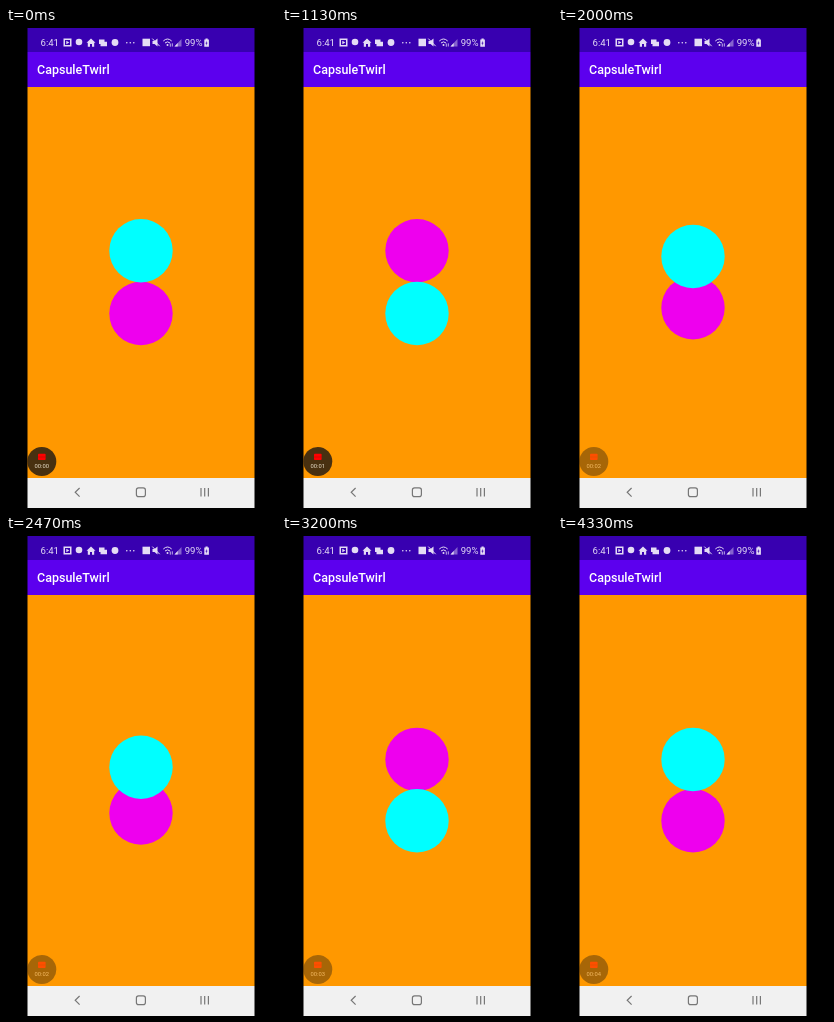
Animation, 270 px wide and 480 px high, one loop 4390 ms. Source, as an HTML page:

```html
<!DOCTYPE html>
<html lang="en">
<head>
<meta charset="utf-8">
<title>CapsuleTwirl</title>
<style>
  html, body { margin: 0; width: 100%; height: 100%; overflow: hidden; background: #000; }
  svg { display: block; width: 100%; height: 100%; }
  text { font-family: Roboto, "Open Sans", sans-serif; }
</style>
</head>
<body>
<svg viewBox="0 0 270 480" xmlns="http://www.w3.org/2000/svg">
  <rect width="270" height="480" fill="#000"/>
  <rect x="21.5" width="227" height="24" fill="#3800b0"/>
  <rect x="21.5" y="24" width="227" height="35" fill="#5c00ee"/>
  <rect x="21.5" y="59" width="227" height="391" fill="#ff9800"/>
  <rect x="21.5" y="450" width="227" height="30" fill="#f1f1f1"/>

  <!-- status bar -->
  <g fill="#e4dcf5">
    <text x="34.5" y="18" font-size="9.6">6:41</text>
    <path d="M57.5 10.5h8v8h-8z M59 12v5h5v-5z" fill-rule="evenodd"/>
    <path d="M60.3 12.8l3 1.7-3 1.7z"/>
    <circle cx="73" cy="14" r="3.3"/>
    <path d="M80.5 14.8L85 10.5l4.5 4.3h-1.3v3.9h-2.2v-2.6h-2v2.6h-2.2v-3.9z"/>
    <path d="M93 11.5h5.5v2.2H101v4.6h-6.5v-2.3H93z"/>
    <circle cx="109" cy="14.5" r="3.4"/>
    <circle cx="120.8" cy="14.7" r=".8"/>
    <circle cx="124.3" cy="14.7" r=".8"/>
    <circle cx="127.8" cy="14.7" r=".8"/>
    <rect x="136.5" y="10.7" width="7.5" height="7.5"/>
    <path d="M146.5 13h2l3-2.5v8l-3-2.5h-2z"/>
    <path d="M146.3 10.6l7.4 7.6" stroke="#e4dcf5" stroke-width="1"/>
    <g fill="none" stroke="#e4dcf5" stroke-width="1">
      <path d="M157.3 13q4.2-4 8.4 0M159 15q2.5-2.3 5 0"/>
      <path d="M164.3 15.5v3.2M166.3 15.3v3.2" stroke-width=".8"/>
    </g>
    <circle cx="161.5" cy="17" r="1"/>
    <path d="M168.5 18.5l7-7.5v7.5z" opacity=".45"/>
    <path d="M168.5 18.5l3.2-3.4v3.4z"/>
    <text x="178.7" y="18" font-size="9.6">99%</text>
    <path d="M198.3 11.4h1.2v-1h2.2v1h1.2v7.4h-4.6z"/>
    <path d="M200.9 12.7l-1.5 2.8h1l-.4 2.2 1.6-2.9h-1z" fill="#3800b0"/>
  </g>

  <text x="31" y="46" font-size="12.5" font-weight="500" fill="#fff">CapsuleTwirl</text>

  <circle id="rear" cx="135" r="31.7" fill="#ee00ee"/>
  <circle id="front" cx="135" r="31.7" fill="#0ff"/>

  <g id="badge">
    <circle cx="35.8" cy="433.5" r="14.5" fill="#483010"/>
    <rect x="32" y="425.8" width="7.6" height="6.2" rx=".8" fill="#f00"/>
    <path d="M32 429h7.6" stroke="#a01004" stroke-width=".5"/>
    <text id="clock" x="35.7" y="440" font-size="5.8" text-anchor="middle" fill="#eee4d0">00:00</text>
  </g>

  <!-- navigation bar -->
  <g fill="none" stroke="#777" stroke-width="1.2">
    <path d="M73.6 460l-4.4 4.3 4.4 4.3"/>
    <rect x="130.4" y="459.9" width="9" height="8.8" rx="2.2"/>
    <path d="M195 460v8.6M198.7 460v8.6M202.4 460v8.6"/>
  </g>
</svg>
<script>
  const LOOP = 4390, STEP = 200 / 3, MID = 254.1, REACH = 31.4;
  // time in ms, turn in degrees: the spin runs slightly unevenly
  const TURN = [[0, 0], [730, 115], [1530, 246], [2470, 403.7],
                [3200, 528], [3730, 603.5], [4330, 707]];
  const [rear, front, badge, clock] =
    ["rear", "front", "badge", "clock"].map(id => document.getElementById(id));

  function angleAt(t) {
    let i = 1;
    while (i < TURN.length - 1 && t > TURN[i][0]) i++;
    const [t0, a0] = TURN[i - 1], [t1, a1] = TURN[i];
    return a0 + (a1 - a0) * (t - t0) / (t1 - t0);
  }

  function draw(now) {
    const t = Math.floor((now % LOOP + 5) / STEP) * STEP;
    const shift = REACH * Math.cos(angleAt(t) * Math.PI / 180);
    front.setAttribute("cy", MID - shift);
    rear.setAttribute("cy", MID + shift);
    const fade = Math.min(1, Math.max(0, (t - 1200) / 300));
    badge.setAttribute("opacity", 1 - 0.52 * fade);
    clock.textContent = "00:0" + Math.floor((t + 340) / 1000);
  }

  const start = performance.now();
  function tick() {
    draw(performance.now() - start);
    requestAnimationFrame(tick);
  }
  tick();
</script>
</body>
</html>
```
